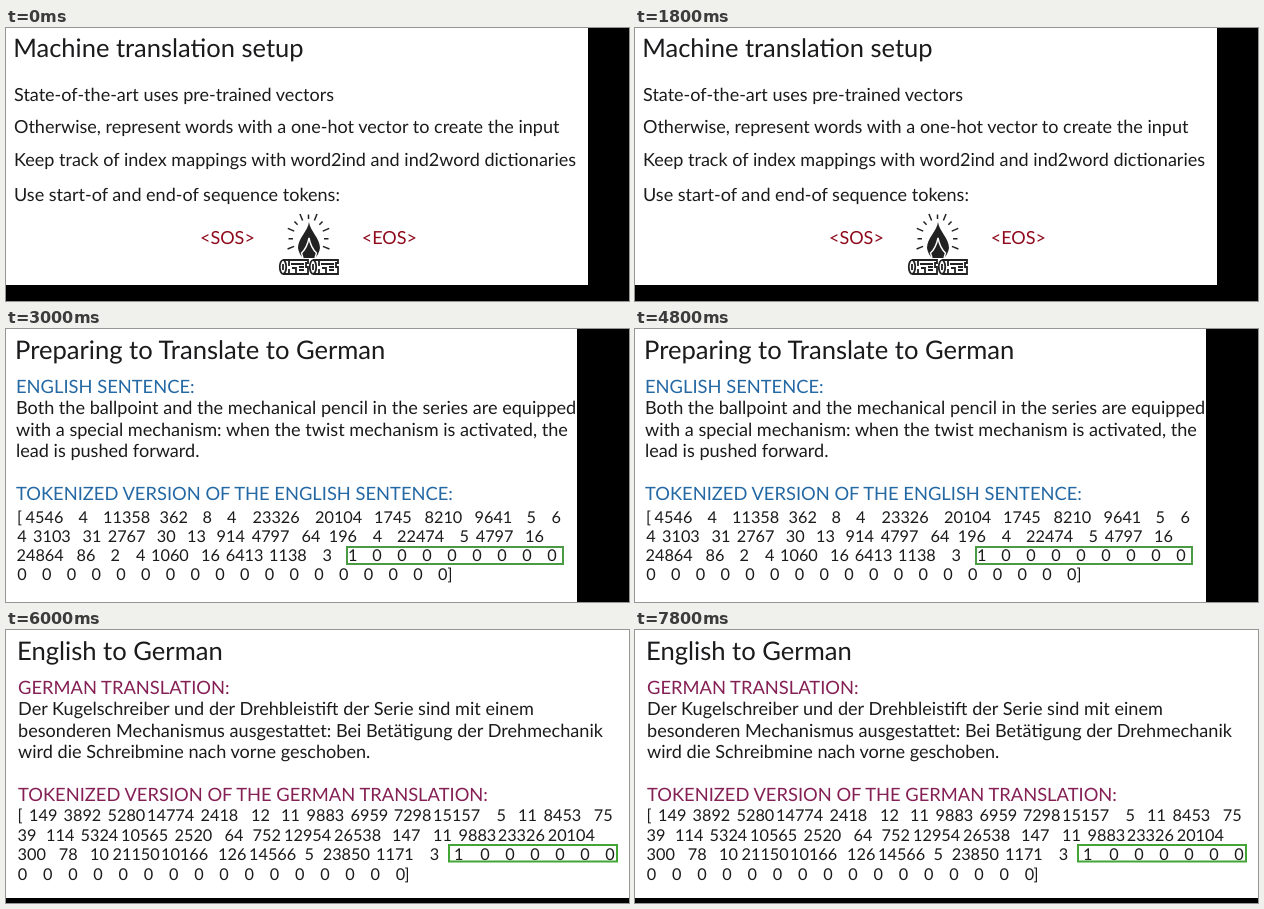
An HTML page for the animation above (9 s loop, 623x273 px).

```html
<!DOCTYPE html>
<html lang="en">
<head>
<meta charset="utf-8">
<title>Machine translation slides</title>
<style>
  html, body { margin: 0; width: 100%; height: 100%; overflow: hidden; background: #000; }
  svg { display: block; width: 623px; height: 273px; }
  text { font-family: Lato, "Open Sans", sans-serif; white-space: pre; text-rendering: geometricPrecision; }
</style>
</head>
<body>
<svg id="stage" viewBox="0 0 623 273"></svg>
<script>
const NS = 'http://www.w3.org/2000/svg';
const stage = document.getElementById('stage');
const INK = '#1b1b1d', BLUE = '#2468a4', PLUM = '#852055', RED = '#8f0a1c';
const BODY = 18.1, HEAD = 18.35, TITLE = 25.6, TOKEN = 16.3;
const HOLD = 3000;

function add(parent, tag, attrs, content) {
  const node = document.createElementNS(NS, tag);
  for (const key in attrs) node.setAttribute(key, attrs[key]);
  if (content) node.textContent = content;
  parent.appendChild(node);
  return node;
}

function slide(width, height) {
  const g = add(stage, 'g', { visibility: 'hidden' });
  add(g, 'rect', { width, height, fill: '#fff' });
  return g;
}

const write = (g, x, y, size, words, fill = INK, anchor = 'start') =>
  add(g, 'text', { x, y, 'font-size': size, fill, 'text-anchor': anchor }, words);

// Each entry is "left:token".
function tokens(g, y, row) {
  for (const entry of row.split(' ')) {
    const [x, word] = entry.split(':');
    write(g, +x, y, TOKEN, word);
  }
}

function zeros(g, x, y, step, count) {
  for (let i = 0; i < count; i++) write(g, x + i * step, y, TOKEN, '0', INK, 'middle');
}

function frameBox(g, x, y, width, height, stroke) {
  add(g, 'rect', { x, y, width, height, fill: 'none', stroke, 'stroke-width': 2 });
}

function campfire(g) {
  const fire = add(g, 'g', { fill: 'none', stroke: '#222', 'stroke-width': 1.5 });
  for (let i = 0; i < 11; i++) {
    const a = Math.PI * (1.12 - i * 0.124);
    const c = Math.cos(a), s = Math.sin(a);
    const far = i % 2 ? 4.5 : 7;
    add(fire, 'path', {
      d: `M${302.5 + 15.5 * c} ${211 - 20 * s}L${302.5 + (15.5 + far) * c} ${211 - (20 + far) * s}`
    });
  }
  add(fire, 'path', { d: 'M303 194C302 203 292 210 292 220Q293 226 297 230H309Q313 226 314 220C314 210 304 203 303 194Z', fill: '#222', stroke: 'none' });
  add(fire, 'path', { d: 'M297 230L295.5 225Q301 220 303 210Q305 220 310.5 225L309 230', stroke: '#fff', 'stroke-width': 1.4 });
  for (const x of [273, 303]) {
    const log = add(fire, 'g', { transform: `translate(${x} 231)` });
    add(log, 'path', { d: 'M4 1H29V4H27V8H29V15H4M12 5H25M13 9H17V14M20 8H25M20 11H25' , 'stroke-width': 1.8 });
    add(log, 'ellipse', { cx: 4, cy: 8, rx: 3.2, ry: 6.8, fill: '#fff', 'stroke-width': 1.8 });
    add(log, 'path', { d: 'M4 5V11M10 2V7M10 10V14', 'stroke-width': 1.8 });
  }
}

function setup() {
  const g = slide(582, 257);
  write(g, 7.2, 29.3, 25.5, 'Machine translation setup');
  [['State-of-the-art uses pre-trained vectors', 73],
   ['Otherwise, represent words with a one-hot vector to create the input', 105],
   ['Keep track of index mappings with word2ind and ind2word dictionaries', 138.3],
   ['Use start-of and end-of sequence tokens:', 173]
  ].forEach(([line, y]) => write(g, 8, y, 18.05, line));
  write(g, 194, 216, 18, '<SOS>', RED);
  write(g, 355.7, 216, 18, '<EOS>', RED);
  campfire(g);
  return g;
}

function textBlock(g, x, color, title, head, lines, tokenHead) {
  write(g, x - 1, 29.5, TITLE, title);
  write(g, x, 64, HEAD, head, color);
  lines.forEach((line, i) => write(g, x, 85 + i * 21.6, BODY, line));
  write(g, x, 171, HEAD, tokenHead, color);
}

function english() {
  const g = slide(571, 273);
  textBlock(g, 10, BLUE, 'Preparing to Translate to German', 'ENGLISH SENTENCE:', [
    'Both the ballpoint and the mechanical pencil in the series are equipped',
    'with a special mechanism: when the twist mechanism is activated, the',
    'lead is pushed forward.'
  ], 'TOKENIZED VERSION OF THE ENGLISH SENTENCE:');
  tokens(g, 194, '11:[ 19.6:4546 72.5:4 97:11358 153.5:362 196.5:8 221:4 246.5:23326 309:20104 368:1745 418.5:8210 468.5:9641 520.5:5 545.5:6');
  tokens(g, 213, '11.3:4 27:3103 76.5:31 101.7:2767 150.7:30 181:13 210.5:914 245.7:4797 295.5:64 322.7:196 366.7:4 391:22474 453.5:5 469.7:4797 519:16');
  tokens(g, 232, '10.5:24864 70.5:86 104.5:2 130:4 145:1060 195:16 219.7:6413 263:1138 316.5:3 342:1');
  zeros(g, 371, 232, 25, 8);
  zeros(g, 16, 251, 24.75, 18);
  write(g, 441.5, 251, TOKEN, ']');
  frameBox(g, 341, 218, 216, 17, '#4b9b45');
  return g;
}

function german() {
  const g = slide(623, 268);
  textBlock(g, 12, PLUM, 'English to German', 'GERMAN TRANSLATION:', [
    'Der Kugelschreiber und der Drehbleistift der Serie sind mit einem',
    'besonderen Mechanismus ausgestattet: Bei Betätigung der Drehmechanik',
    'wird die Schreibmine nach vorne geschoben.'
  ], 'TOKENIZED VERSION OF THE GERMAN TRANSLATION:');
  tokens(g, 191, '11.5:[ 23:149 57.5:3892 101.5:5280 141:14774 194.5:2418 245:12 275:11 300.5:9883 344.5:6959 387.7:7298 427:15157 490.5:5 512:11 537.5:8453 587.7:75');
  tokens(g, 210.5, '11.5:39 40:114 74.5:5324 115:10565 168.5:2520 218.5:64 246.5:752 278:12954 328:26538 386:147 427:11 452.5:9883 491.7:23326 541.7:20104');
  tokens(g, 230, '11.5:300 52.7:78 84:10 106.5:21150 155:10166 212:126 243:14566 298.5:5 316.7:23850 370:1171 423.7:3 448:1');
  zeros(g, 479, 230, 25, 6);
  zeros(g, 16.5, 249.5, 25.2, 16);
  write(g, 398.5, 249.5, TOKEN, ']');
  frameBox(g, 443, 215, 168, 16.5, '#43a535');
  return g;
}

const slides = [setup(), english(), german()];

function draw() {
  const now = Math.floor(performance.now() / HOLD) % slides.length;
  slides.forEach((g, i) => g.setAttribute('visibility', i === now ? 'visible' : 'hidden'));
  requestAnimationFrame(draw);
}
draw();
</script>
</body>
</html>
```
